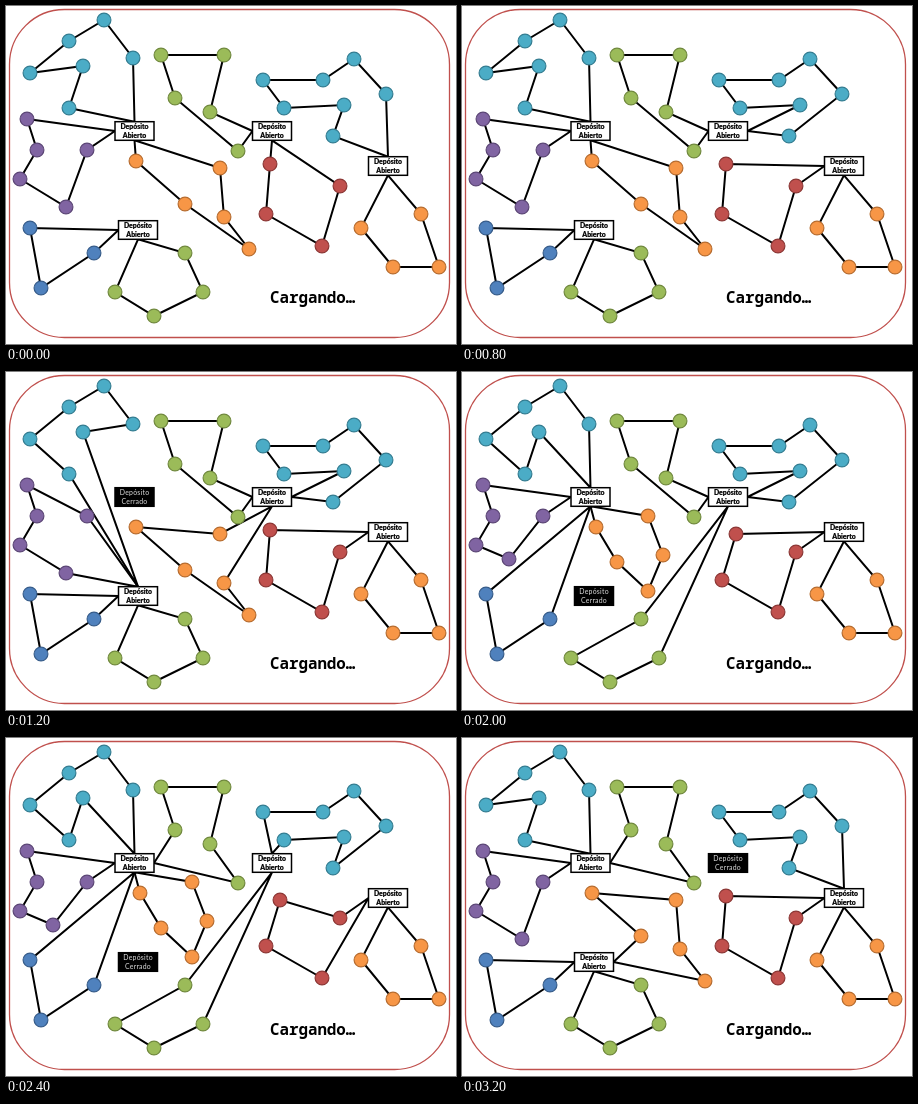
An HTML page for the animation above (3.6 s loop, 450x338 px).

```html
<!DOCTYPE html>
<html lang="es">
<head>
<meta charset="utf-8">
<style>
html, body { margin: 0; width: 100%; height: 100%; overflow: hidden; background: #fff; }
svg { display: block; width: 100vw; height: 100vh; }
text { text-anchor: middle; }
.label { font: 800 6.9px Lato, "Open Sans", sans-serif; stroke: #000; stroke-width: .2px; }
.closed { font-weight: 400; fill: #ddd; stroke: none; letter-spacing: .25px; }
.status { font: 600 15.8px "Noto Sans Mono", "DejaVu Sans Mono", monospace; text-anchor: start; }
polyline { fill: none; stroke: #000; stroke-width: 2; }
</style>
</head>
<body>
<svg viewBox="0 0 450 338">
  <rect x="3.5" y="3.5" width="440" height="328" rx="55" fill="#fff" stroke="#c0504d" stroke-width="1.3"/>
  <g id="scene"></g>
  <text class="status" x="264" y="297">Cargando…</text>
</svg>
<script>
const STEP = 400, HALF_W = 19.5, HALF_H = 9.3;
const depots = { A: [128.5, 125], B: [266, 125], C: [382, 160], D: [132, 224] };
const sides = { t: [0, -HALF_H], b: [0, HALF_H], l: [-HALF_W, 0], r: [HALF_W, 0] };
const colors = {
  cyan: ['#4bacc6', '#357d91'], purple: ['#8064a2', '#5c4776'],
  orange: ['#f79646', '#b66d31'], green: ['#9bbb59', '#71893f'],
  red: ['#c0504d', '#8c3836'], blue: ['#4f81bd', '#385d8a']
};

// Customers of each group are called a, b, c… in this order.
const groups = {
  west: 'cyan 127,52 98,14 63,35 24,67 77,60 63,102',
  purple: 'purple 21,113 31,144 14,173 60,201 81,144 47,187 74,130',
  center: 'orange 130,155 179,198 243,243 218,211 214,162 134,155 155,190 186,219 201,183 186,144',
  north: 'green 204,106 218,49 155,49 169,92 232,145',
  east: 'cyan 380,88 348,53 317,74 257,74 278,102 338,99 327,130',
  red: 'red 264,158 260,208 316,240 334,180 274,162 310,180',
  corner: 'orange 415,208 433,261 387,261 355,222',
  blue: 'blue 24,222 35,282 88,247',
  south: 'green 179,247 197,286 148,310 109,286'
};

// A tour is a depot, the side it leaves from, and the customers in visiting order.
const base = {
  west: 'At abcdef', purple: 'Al abcde', center: 'Ab abcde',
  north: 'Bl abcde', east: 'Ct abcdefg', red: 'Bb abcd',
  corner: 'Cb abcd', blue: 'Dl abc', south: 'Db abcd'
};
const eastB = { east: 'Br fedcbag' };
const redC = { red: 'Cl abcd' };
const northA = { north: 'Ar dcbae' };
const closedD = {
  closed: 'D', ...eastB, blue: 'Ab abc', purple: 'Al abcfe',
  center: 'Ab fghij', south: 'Bb adcb', red: 'Cl ebcd'
};
const westInner = { west: 'At abcdfe' };

const plans = [
  {},
  { closed: 'C', ...eastB, blue: 'Ab abc', purple: 'Al gabcf', red: 'Bb abcf', corner: 'Br abcd' },
  { ...eastB, ...redC },
  { closed: 'A', ...eastB, ...redC, west: 'Dt fdcbae', purple: 'Dt eabcd', center: 'Bb eabcd' },
  { ...closedD, west: 'At eabcdf' },
  { ...closedD, ...westInner },
  { ...closedD, ...westInner, ...northA, east: 'Bt dcbagfe', red: 'Cl debc' },
  { ...northA, ...redC },
  { closed: 'B', ...northA, ...redC, center: 'Dr baedc' }
];

function drawTour(group, tour) {
  const [color, ...customers] = groups[group].split(' ');
  const [[depot, side], order] = tour.split(' ');
  const stops = [...order].map(c => customers[c.charCodeAt(0) - 97].split(','));
  const gate = depots[depot].map((v, i) => v + sides[side][i]);
  const [fill, stroke] = colors[color];
  return {
    line: `<polyline points="${[gate, ...stops, gate].join(' ')}"/>`,
    nodes: stops.map(([x, y]) =>
      `<circle cx="${x}" cy="${y}" r="6.9" fill="${fill}" stroke="${stroke}" stroke-width="1.2"/>`).join('')
  };
}

function drawDepot([x, y], shut) {
  const style = shut ? 'label closed' : 'label';
  return `<rect x="${x - HALF_W}" y="${y - HALF_H}" width="${2 * HALF_W}" height="${2 * HALF_H}"
      fill="${shut ? '#000' : '#fff'}" stroke="#000" stroke-width="1.5"/>
    <text class="${style}" x="${x}" y="${y - 1.7}">Depósito</text>
    <text class="${style}" x="${x}" y="${y + 6.8}">${shut ? 'Cerrado' : 'Abierto'}</text>`;
}

function render(plan) {
  const { closed, ...tours } = { ...base, ...plan };
  const drawn = Object.entries(tours).map(entry => drawTour(...entry));
  const boxes = Object.entries(depots).map(([name, at]) => drawDepot(at, name === closed));
  return [...drawn.map(d => d.line), ...drawn.map(d => d.nodes), ...boxes].join('');
}

const scene = document.getElementById('scene');
const start = performance.now();
let shown = -1;
function tick() {
  const index = Math.floor((performance.now() - start) / STEP) % plans.length;
  if (index !== shown) scene.innerHTML = render(plans[shown = index]);
  requestAnimationFrame(tick);
}
tick();
</script>
</body>
</html>
```
